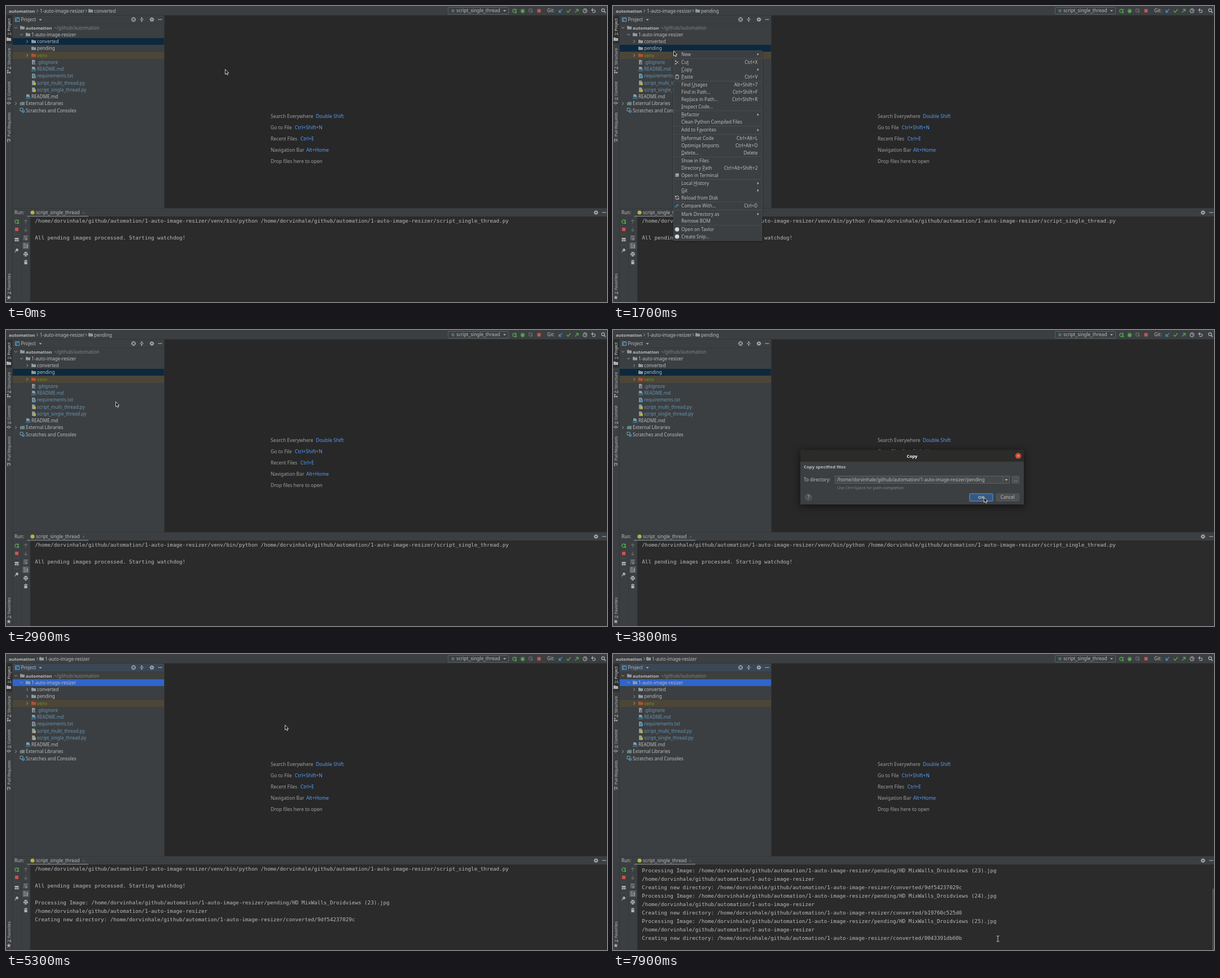
These frames come from a looping animation (1065x526 px, 8 s). An HTML page with a canvas:

```html
<!DOCTYPE html>
<html lang="en">
<head>
<meta charset="utf-8">
<title>Image resizer run</title>
<style>
html, body { margin: 0; width: 100%; height: 100%; overflow: hidden; background: #282828; }
canvas { display: block; width: 1065px; height: 526px; }
</style>
</head>
<body>
<canvas id="stage"></canvas>
<script>
const W = 1065, H = 526, LOOP = 8000;
const canvas = document.getElementById('stage');
const dpr = window.devicePixelRatio || 1;
canvas.width = W * dpr;
canvas.height = H * dpr;
const c = canvas.getContext('2d');

const UI = '"Noto Sans", "Open Sans", sans-serif';
const MONO = '"DejaVu Sans Mono", "Noto Sans Mono", monospace';
const PANEL = '#3c3f41', EDGE = '#323435', TEXT = '#bbbbbb', ICON = '#afb1b3',
  GREEN = '#55a350', RED = '#c75450', BLUE = '#3c92c2', FILE = '#6694b5', DIM = '#67696a';

const HOME = '/home/dorvinhale/github/automation/1-auto-image-resizer';
const SCRIPT = 'script_single_thread';

// ---------- helpers ----------
function rect(x, y, w, h, color) {
  c.fillStyle = color;
  c.fillRect(x, y, w, h);
}
function box(x, y, w, h, r, fill, line, lw = 1) {
  c.beginPath();
  c.roundRect(x, y, w, h, r);
  if (fill) { c.fillStyle = fill; c.fill(); }
  if (line) { c.strokeStyle = line; c.lineWidth = lw; c.stroke(); }
}
function dot(x, y, r, color) {
  c.fillStyle = color;
  c.beginPath();
  c.arc(x, y, r, 0, 7);
  c.fill();
}
function ring(x, y, r, color, w = 1) {
  c.strokeStyle = color;
  c.lineWidth = w;
  c.beginPath();
  c.arc(x, y, r, 0, 7);
  c.stroke();
}
function text(s, x, cy, color = TEXT, size = 8.15, align = 'left', weight = 400) {
  c.font = `${weight} ${size}px ${UI}`;
  c.fillStyle = color;
  c.textAlign = align;
  c.fillText(s, x, cy + 3);
}
const bold = (s, x, cy, color = TEXT, align = 'left') => text(s, x, cy, color, 7.85, align, 700);

// path drawn around its own centre
function path(x, y, d, color, w = 1) {
  const p = new Path2D(d);
  c.save();
  c.translate(x, y);
  if (w) {
    c.strokeStyle = color;
    c.lineWidth = w;
    c.stroke(p);
  } else {
    c.fillStyle = color;
    c.fill(p);
  }
  c.restore();
}
const fillPath = (x, y, d, color) => path(x, y, d, color, 0);

// ---------- icons ----------
const folder = (x, y, color = '#8f9aa1') =>
  fillPath(x, y, 'M-4-3H-1L0-2H4V3H-4Z', color);
const chevron = (x, y, open) =>
  path(x, y, open ? 'M-2.3-1.2L0 1.2L2.3-1.2' : 'M-1.2-2.4L1.2 0L-1.2 2.4', '#a5a7a8', 1);
const triangle = (x, y) => fillPath(x, y, 'M-2.6-1.3H2.6L0 1.6Z', ICON);
const minus = (x, y) => path(x, y, 'M-3.5 0H3.5', ICON, 1.1);
const stop = (x, y) => rect(x - 3, y - 3, 6, 6, RED);
const page = (x, y) => fillPath(x, y, 'M-3-4H1L3-2V4H-3Z', '#8f9aa1');

function gear(x, y) {
  ring(x, y, 2.1, ICON, 1.5);
  path(x, y, 'M0-4V-2.5M0 2.5V4M-4 0H-2.5M2.5 0H4M-2.8-2.8L-1.8-1.8M1.8 1.8L2.8 2.8M-2.8 2.8L-1.8 1.8M1.8-1.8L2.8-2.8', ICON, 1.3);
}
function rerun(x, y) {
  path(x, y, 'M1 3A3 3 0 1 1 2-1.8', GREEN, 1.3);
  fillPath(x, y, 'M3.5-4V0H-.3Z', GREEN);
  rect(x + 1, y + 1, 3, 3, GREEN);
}
function fileIcon(kind, x, y) {
  if (kind === 'dir') return folder(x, y);
  if (kind === 'venv') return folder(x, y, '#b0532f');
  if (kind === 'lib') {
    for (let i = 0; i < 4; i++) rect(x - 4 + i * 2.1, y - 3 + (i === 0), 1.5, 6 - (i === 0), i % 2 ? '#62a9a0' : '#8f9aa1');
    return;
  }
  if (kind === 'scratch') {
    path(x - 1, y - 1, 'M-3-3H2V2H-3Z', '#8f9aa1', 1);
    dot(x + 1.5, y + 1.5, 2.7, BLUE);
    return path(x + 1.5, y + 1.5, 'M0-1.6V0H1.2', '#263238', .8);
  }
  page(x, y);
  if (kind === 'py') dot(x + 1.6, y + 1.6, 2.5, '#b5b04a');
  else if (kind === 'md') {
    rect(x - 4, y, 8, 4, '#3d7f9e');
    path(x, y + 2, 'M-3 1.2V-1L-1.8.3L-.6-1V1.2M2-1V1M1 .2L2 1.2L3 .2', '#22323a', .7);
  } else if (kind === 'txt') {
    rect(x - 1, y, 5, 4, '#4d8fae');
    path(x, y, 'M-1.8-1.5H1.2M-1.8 0H1', PANEL, .7);
  } else ring(x + 1, y + 1, 1.8, '#45494b', 1);
}

// ---------- static areas ----------
function toolbar(crumb) {
  rect(0, 0, W, 16, PANEL);
  rect(0, 16, W, 1, EDGE);
  bold('automation', 5, 8.5);
  chevron(55.5, 8.5);
  if (crumb) {
    text('1-auto-image-resizer', 60, 8.5);
    chevron(142, 8.5);
    folder(150, 8.5);
    text(crumb, 156, 8.5);
  } else {
    folder(63, 8.5);
    text('1-auto-image-resizer', 69, 8.5);
  }
  box(783.5, 2.5, 107, 12, 1.5, null, '#5e6163');
  dot(792, 8.5, 3, '#4a7260');
  text(SCRIPT, 798, 8.2, TEXT, 8.25);
  triangle(883.5, 8.5);
  rerun(901, 8.5);
  box(912.8, 6, 5.4, 6.6, 2.5, GREEN);
  path(915.5, 8.5, 'M-4-1H4M-4 1.5H4M-2-4L-1-2M2-4L1-2', GREEN, .9);
  path(930, 8.5, 'M-3.5-3H2V0M-3.5-3V1L-1 3', DIM, 1.3);
  fillPath(930, 8.5, 'M0-1L4 1.5L0 4Z', DIM);
  stop(944.5, 8.5);
  text('Git:', 959, 8.2);
  path(982.5, 8.5, 'M3-3L-2.5 2.5M-2.5-1.5V2.5H1.5', BLUE, 1.4);
  path(997, 8.5, 'M-3.5 0L-1 2.7L3.5-2.7', GREEN, 1.5);
  path(1011.5, 8.5, 'M-3 3L2.5-2.5M-1.5-2.5H2.5V1.5', GREEN, 1.4);
  ring(1026, 8.5, 3.4, ICON, 1.1);
  path(1026, 8.5, 'M0-2.2V.3H2', ICON, 1);
  path(1041, 8.5, 'M-3-1.5H1A2.2 2.2 0 0 1 1 3H-2M-.8-4L-3.2-1.5L-.8 1', ICON, 1.2);
  ring(1058, 7.5, 2.6, ICON, 1.2);
  path(1058, 7.5, 'M2 2L4.5 4.7', ICON, 1.4);
}

function sideTab(s, bottom, key, color = TEXT) {
  c.save();
  c.translate(7.5, bottom);
  c.rotate(-Math.PI / 2);
  c.font = `6.85px ${UI}`;
  c.textAlign = 'left';
  c.fillStyle = color;
  c.fillText(s, 0, 0);
  if (key) rect(0, 1, 4, .6, color);
  c.restore();
}
function sidebar() {
  rect(0, 17, 11, H, PANEL);
  rect(0, 17, 11, 50, '#2d2f30');
  rect(11, 17, .6, H, EDGE);
  sideTab('1: Project', 52, true, '#e4e4e4');
  folder(5, 59, ICON);
  sideTab('Z: Structure', 112, true);
  rect(2, 117, 2.5, 2.5, ICON);
  rect(5.5, 117, 2.5, 2.5, ICON);
  rect(2, 114, 2.5, 2, ICON);
  sideTab('0: Commit', 167, true);
  ring(5, 172.5, 1.8, ICON);
  path(5, 172.5, 'M-4 0H-2M2 0H4', ICON);
  sideTab('Pull Requests', 232);
  path(5, 239, 'M-2 3V-2H2V2M-3-2H-1', ICON, 1.2);
  sideTab('2: Favorites', 512, true);
  fillPath(5, 518, 'M0-4L1-1.2H4L1.6.6L2.5 3.5L0 1.8L-2.5 3.5L-1.6.6L-4-1.2H-1Z', ICON);
}

const TREE = [
  [0, 'automation', 'dir', 'open'],
  [1, '1-auto-image-resizer', 'dir', 'open'],
  [2, 'converted', 'dir', 'shut'],
  [2, 'pending', 'dir', ''],
  [2, 'venv', 'venv', 'shut', '#85851f'],
  [2, '.gitignore', 'cfg', '', FILE],
  [2, 'README.md', 'md', '', FILE],
  [2, 'requirements.txt', 'txt', '', FILE],
  [2, 'script_multi_thread.py', 'py', '', FILE],
  [2, SCRIPT + '.py', 'py', '', FILE],
  [1, 'README.md', 'md', ''],
  [0, 'External Libraries', 'lib', 'shut'],
  [0, 'Scratches and Consoles', 'scratch', '']
];
function project(selected, focused, filled) {
  const left = 11.6, width = 268.8;
  rect(left, 17, width, 342, PANEL);
  rect(left, 17, width, 14.5, focused ? '#3b4754' : PANEL);
  rect(left, 31.5, width, .7, EDGE);
  box(16.5, 21, 7, 6.5, 0, null, '#8f9aa1');
  rect(16, 20.5, 8, 2, BLUE);
  rect(17.5, 23.5, 2, 3, BLUE);
  text('Project', 26.5, 24);
  triangle(61, 24.5);
  ring(226, 24, 3.2, ICON, 1.1);
  path(226, 24, 'M-4.2 0H-1M1 0H4.2M0-4.2V-1M0 1V4.2', ICON, 1.1);
  path(240.5, 24, 'M-3.5 0H3.5M0-4V-1.5M0 1.5V4M-1.5-3L0-1.5L1.5-3M-1.5 3L0 1.5L1.5 3', ICON, 1);
  gear(258.5, 24);
  minus(273, 24);
  TREE.forEach(([level, name, kind, arrow, color], i) => {
    const y = 38.6 + i * 12.25, x = 17.5 + level * 10, top = Math.round(y - 6.1);
    if (kind === 'venv') rect(left, top, width, 12, '#4c4638');
    if (i === selected) rect(left, top, width, 12, focused ? '#2f65ca' : '#0d293e');
    if (arrow || (i === 3 && filled)) chevron(x, y, arrow === 'open');
    fileIcon(kind, x + 11.5, y);
    if (i) text(name, x + 17.5, y, color);
    else bold(name, x + 17.5, y);
  });
  text('~/github/automation', 85, 38.6, '#818384');
  rect(left + width, 17, .6, 342, EDGE);
}

function editor() {
  rect(281, 17, W - 281, 342, '#282828');
  [['Search Everywhere', 'Double Shift', 549],
   ['Go to File', 'Ctrl+Shift+N', 511.8],
   ['Recent Files', 'Ctrl+E', 521.8],
   ['Navigation Bar', 'Alt+Home', 532],
   ['Drop files here to open', '', 0]].forEach(([label, keys, x], i) => {
    text(label, 469, 196 + i * 20, '#a0a0a0', 8.5);
    text(keys, x, 196 + i * 20, '#589df6', 8.6);
  });
}

// ---------- run window ----------
const LOG = [`${HOME}/venv/bin/python ${HOME}/${SCRIPT}.py`, '',
  'All pending images processed. Starting watchdog!', ''];
['9df54237029c', 'b19760c525d0', '0043391db60b'].forEach((id, i) => LOG.push(
  `Processing Image: ${HOME}/pending/HD MixWalls_Droidviews (${23 + i}).jpg`,
  HOME,
  `Creating new directory: ${HOME}/converted/${id}`));

function runWindow(lines, scroll) {
  rect(11.6, 359, W, 16, PANEL);
  rect(11.6, 359, W, .7, EDGE);
  text('Run:', 15, 367);
  dot(47, 367, 3.6, '#b5b04a');
  text(SCRIPT, 53, 367, TEXT, 8.25);
  path(137.5, 367.5, 'M-1.6-1.6L1.6 1.6M1.6-1.6L-1.6 1.6', '#6f7274', .8);
  gear(1045.5, 367);
  minus(1060, 367);

  rect(11.6, 375, 32, H, PANEL);
  rect(27, 375, .6, H, EDGE);
  rerun(19, 383);
  stop(19, 397);
  rect(13.5, 405.5, 11, .6, '#515456');
  rect(15.5, 412, 7, 2.7, ICON);
  rect(15.5, 415.5, 3.2, 2.7, ICON);
  rect(19.3, 415.5, 3.2, 2.7, ICON);
  rect(13.5, 424.5, 11, .6, '#515456');
  path(19, 434, 'M-3.5 3.5L-.7.7M-2-1.2L1.5 2.2', ICON, 1.1);
  fillPath(19, 434, 'M.5-3.5L3.5-.5L1.2 1.8L-1.8-1.2Z', ICON);
  path(35, 383, 'M0 3.5V-3M-2.6-.5L0-3L2.6-.5', DIM, 1.2);
  path(35, 397.5, 'M0-3.5V3M-2.6.5L0 3L2.6.5', DIM, 1.2);
  path(35, 412, 'M-4-3H4M-4 0H2A1.6 1.6 0 0 1 2 3H-.5M1 1.5L-.7 3L1 4.5M-4 3H-2', ICON, 1);
  box(29, 420, 12, 12, 1.5, '#55595b');
  path(35, 426, 'M-4-3H0M-4 0H0M-4 3.2H4M2.5-3.5V1.2M.9-.2L2.5 1.5L4.1-.2', ICON, 1);
  fillPath(35, 441, 'M-2.5-4H2.5V-2H-2.5ZM-4-1.3H4V2H2.5V.8H-2.5V2H-4ZM-1.8 1.6H1.8V4H-1.8Z', ICON);
  fillPath(35, 455, 'M-3.2-3H-1V-4H1V-3H3.2V-2H-3.2ZM-2.6-1.2H2.6V4H-2.6Z', ICON);

  c.save();
  c.beginPath();
  c.rect(43, 374, W, H);
  c.clip();
  rect(43, 374, W, H, '#2b2b2b');
  c.font = `9.24px ${MONO}`;
  c.textAlign = 'left';
  c.fillStyle = TEXT;
  LOG.slice(0, lines).forEach((s, i) => c.fillText(s, 51.3, 385.2 + i * 15 - scroll));
  if (scroll) rect(1062, scroll > 20 ? 417 : 387, 3, 140, '#4d4d4d');
  c.restore();
  rect(37, 372.8, 109, 1.6, '#747a80');
}

// ---------- popup menu ----------
// "&" marks the access key, "-" starts a new group, ">" a submenu
const MENU = ['New|>', '-Cu&t|Ctrl+X', '&Copy|>', '&Paste|Ctrl+V',
  '-Find &Usages|Alt+Shift+7', 'Find in Path...|Ctrl+Shift+F', 'Rep&lace in Path...|Ctrl+Shift+R', '&Inspect Code...|',
  '-&Refactor|>', 'Clean Python Compiled Files|', '-Add to F&avorites|>',
  '-&Reformat Code|Ctrl+Alt+L', 'Optimi&ze Imports|Ctrl+Alt+O', '&Delete...|Delete',
  '-Show in Files|', 'Directory &Path|Ctrl+Alt+Shift+2', 'Open in Terminal|',
  '-Local &History|>', '&Git|>', 'Reload from Disk|', '-Compare With...|Ctrl+D',
  '-Mark Directory as|>', 'Remove BOM|', '-Open on Tavlor|', 'Create Snip...|'];

function menuIcon(i, x, y) {
  if (i === 1) {
    path(x, y, 'M-3-3L2.5 2M-3 3L2.5-2', ICON, 1);
    dot(x - 2.5, y - 2.5, 1.2, ICON);
    dot(x - 2.5, y + 2.5, 1.2, ICON);
  } else if (i === 3) {
    path(x, y, 'M-2.5-3H2.5V3.5H-2.5Z', ICON, 1);
    rect(x - 1.4, y - 4, 2.8, 2, ICON);
  } else if (i === 16) {
    box(x - 3, y - 3, 6, 6, 0, ICON);
    path(x, y, 'M-2-1.5L-.5 0L-2 1.5M0 1.8H2', PANEL, .8);
  } else if (i === 19) {
    path(x, y, 'M3-.5A3 3 0 0 0-2.5-1.7M-3 .5A3 3 0 0 0 2.5 1.7M-3-3.5V-1.2H-.8M3 3.5V1.2H.8', ICON, 1.1);
  } else if (i === 20) {
    path(x, y, 'M3.5-1.3H-1M.8-3L-1-1.3L.8.4', BLUE, 1.1);
    path(x, y, 'M-4 1.5H0M-2 0L-3.7 1.5L-2 3', BLUE, 1);
  } else if (i > 22) dot(x, y, 3.8, '#d5d7d8');
}
function menu(hover) {
  c.save();
  c.shadowColor = 'rgba(0,0,0,.35)';
  c.shadowBlur = 4;
  c.shadowOffsetY = 1;
  rect(107, 79, 157, 338, PANEL);
  c.restore();
  box(107.3, 79.3, 156.4, 337.4, 0, null, '#515354', .7);
  let y = 73;
  MENU.forEach((item, i) => {
    const [raw, key] = item.split('|');
    y += 12.75;
    if (raw[0] === '-') {
      y += 1.8;
      rect(108, y - 7.4, 155, .7, '#515354');
    }
    if (i === hover) rect(107.7, y - 6.4, 155.6, 12.8, '#4b6eaf');
    const marked = raw.replace('-', ''), label = marked.replace('&', ''), at = marked.indexOf('&');
    text(label, 121, y);
    if (at >= 0) {
      const x = 121 + c.measureText(label.slice(0, at)).width;
      rect(x, y + 4, c.measureText(label[at]).width, .6, TEXT);
    }
    menuIcon(i, 113.5, y);
    if (key === '>') fillPath(257, y, 'M-1.3-2.3L1.7 0L-1.3 2.3Z', ICON);
    else text(key, 256.3, y, TEXT, 8.15, 'right');
  });
}

// ---------- copy dialog ----------
function dialog(pressed) {
  c.save();
  c.shadowColor = 'rgba(0,0,0,.6)';
  c.shadowBlur = 14;
  c.shadowOffsetY = 3;
  box(332, 213, 396, 97, [4, 4, 0, 0], PANEL);
  c.restore();
  box(332, 213, 396, 21, [4, 4, 0, 0], '#2b2b2a');
  bold('Copy', 530, 223.8, '#ffffff', 'center');
  dot(718, 223.5, 5.2, '#c8493b');
  path(718, 223.5, 'M-1.7-1.7L1.7 1.7M1.7-1.7L-1.7 1.7', '#f0dcd8', .9);
  bold('Copy specified files', 338, 243.3);
  text('To directory:', 338, 266.2);
  box(393.5, 259.5, 309, 13, 0, '#45494a', pressed ? '#646667' : '#466d94', pressed ? .8 : 1.8);
  rect(690.5, 260, .7, 12.4, '#646667');
  triangle(697, 266.3);
  text(HOME + '/pending', 397, 266.2);
  box(707, 259.8, 12.6, 12.6, 1, '#4c5052', '#5e6060', .8);
  text('...', 713.3, 265.5, TEXT, 8.15, 'center');
  text('Use Ctrl+Space for path completion', 397.5, 280, '#818384', 7.1);
  dot(346.3, 297.3, 6, '#4c5052');
  ring(346.3, 297.3, 6, '#5e6060', .8);
  text('?', 346.3, 297.3, TEXT, 8.5, 'center');
  box(632, 290.8, 41, 13.4, 2, '#365880', pressed ? '#4878a8' : '#4c708c', pressed ? 1.8 : .8);
  bold('OK', 652.5, 297.3, TEXT, 'center');
  box(679, 291, 40.6, 13, 2, '#4c5052', '#5e6060', .8);
  text('Cancel', 699.3, 297.3, TEXT, 8.15, 'center');
}

// ---------- pointer ----------
// first step, last step, end position
const MOVES = [
  [300, 400, 197, 109], [600, 900, 107, 79.5], [1900, 2000, 186, 135],
  [2200, 2400, 194, 127], [3000, 3000, 300, 149], [3100, 3500, 657, 276],
  [3700, 3800, 657, 297], [4100, 4400, 494, 125], [4700, 4700, 494, 125.6],
  [6700, 7400, 685, 506.5], [7500, 7600, 682, 506]];

function pointerAt(t) {
  let x = 388, y = 112;
  for (const [from, to, ex, ey] of MOVES) {
    if (t < from) break;
    const k = Math.min(1, (t - from + 100) / (to - from + 100));
    x += (ex - x) * k;
    y += (ey - y) * k;
  }
  return [x, y];
}
function pointer(x, y) {
  if (y > 375) {
    const beam = 'M-2.5-5H-.8L0-4.3L.8-5H2.5M0-4.3V4.3M-2.5 5H-.8L0 4.3L.8 5H2.5';
    path(x, y, beam, '#111', 2);
    path(x, y, beam, '#e8e8e8', 1);
    return;
  }
  const arrow = 'M.5.5V9.3L2.5 7.5L3.9 10.6L5.4 9.9L4 7H6.6Z';
  fillPath(x, y, arrow, '#0c0c0c');
  path(x, y, arrow, '#e6e6e6', .9);
}

// ---------- scene ----------
function draw(now) {
  const t = Math.floor(now % LOOP / 100) * 100;
  const copied = t >= 4200;
  const [x, y] = pointerAt(t);
  c.setTransform(dpr, 0, 0, dpr, 0, 0);
  editor();
  toolbar(copied ? '' : t < 1500 ? 'converted' : 'pending');
  project(copied ? 1 : t < 1100 ? 2 : 3, copied || (t >= 1100 && t < 1700), copied);
  runWindow(t < 5300 ? 4 : t < 6600 ? 7 : t < 7900 ? 10 : 13, t < 6600 ? 0 : t < 7900 ? 12 : 57);
  sidebar();
  if (t >= 1700 && t < 2500) menu(t < 1900 ? -1 : t < 2000 ? 2 : t < 2200 ? 4 : 3);
  if (t >= 3000 && t < 4100) dialog(t >= 3700);
  pointer(x, y);
}

const start = performance.now();
function tick() {
  draw(performance.now() - start);
  requestAnimationFrame(tick);
}
tick();
</script>
</body>
</html>
```
